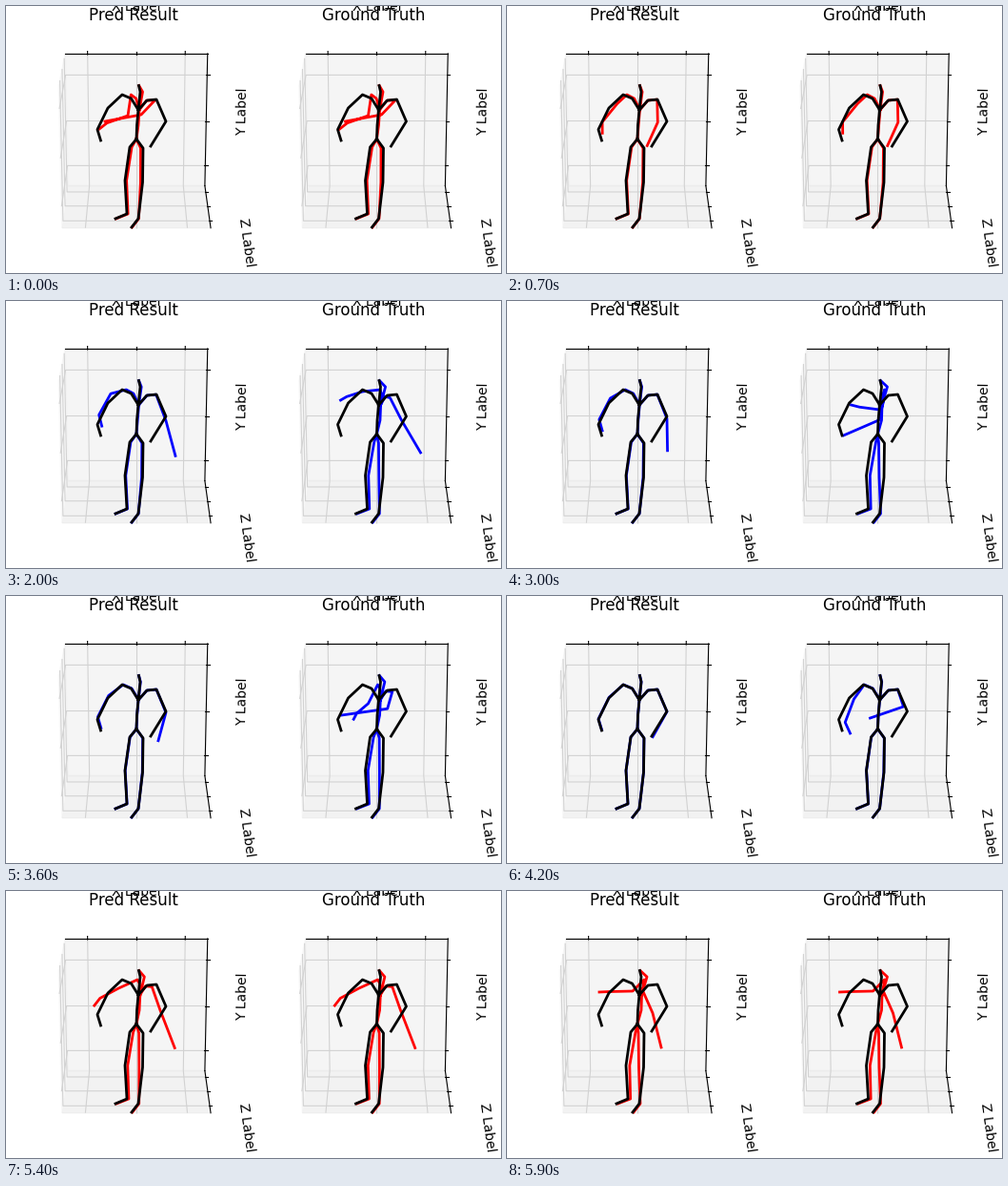
These frames come from a looping animation (520 by 280 pixels, 6000 ms). A matplotlib script:

```python
import numpy as np
import matplotlib.pyplot as plt
from matplotlib.animation import FuncAnimation

W, H, DPI = 520, 280, 100
FRAMES, STEP = 60, 100
SEEN, GOAL = 1400, 4500            # last seen pose and goal pose, in ms
PAD, SIDE, TOP = 15, 237.5, 23.8   # panel layout in pixels
PANEL_SHIFT = SIDE + PAD
LIMIT = 0.7 * 25 / 24              # half range of each axis with its margin

plt.rcParams.update({"font.family": "DejaVu Sans", "grid.color": "#d2d2d2"})

# Joints of the body facing front, in pixels of the left panel.
TRUNK = np.array([(137, 139.5), (137.5, 125), (139, 109), (141, 90), (139.5, 83.5)])
LEG_A = np.array([(130, 148), (125, 183), (127, 218), (115, 223)])
LEG_B = np.array([(144, 149), (143.5, 185), (139, 223), (132, 232)])
SHOULDER_A = np.array([(131.5, 97), (122, 93)])
SHOULDER_B = np.array([(148, 99), (158, 98)])

# Time: turn of the body in degrees, then elbow and hand of arms A and B.
KEYS = {
    0: (25, 128, 115, 98, 129, 142, 114, 104, 121),
    SEEN: (15, 111, 94, 101, 128, 168, 127, 179, 163),
    2000: (58, 122, 95, 99, 104, 163, 125, 183, 159),
    3000: (90, 139, 114, 109, 109, 138, 125, 101, 141),
    4200: (2, 112, 108, 108, 144, 164, 116, 129, 128),
    GOAL: (0, 107, 107, 99.5, 141, 168, 121, 152, 147),
    4900: (12, 108, 102, 92.5, 133, 168, 122, 178, 160),
    5900: (90, 132, 105, 97, 106, 153, 128, 162, 164),
}
TIMES = np.array(list(KEYS), float)
STATES = np.array(list(KEYS.values()), float)
SLOPES = np.gradient(STATES, TIMES, axis=0)


def true_state(t):
    """Cubic Hermite curve through the keys."""
    i = int(np.clip(np.searchsorted(TIMES, t) - 1, 0, len(TIMES) - 2))
    h = TIMES[i + 1] - TIMES[i]
    u = (t - TIMES[i]) / h
    ease = u * u * (3 - 2 * u)
    return (STATES[i] * (1 - ease) + STATES[i + 1] * ease
            + h * u * (1 - u) * ((1 - u) * SLOPES[i] - u * SLOPES[i + 1]))


def guessed_state(t):
    """Blend from the last seen pose to the goal; hand B starts late."""
    u = (t - SEEN) / (GOAL - SEEN)
    late = u ** 1.3
    weight = np.full(STATES.shape[1], 1 - (1 - u) ** 1.3)
    weight[-2:] = late * late * (3 - 2 * late)
    return true_state(SEEN) * (1 - weight) + true_state(GOAL) * weight


def shifted(joints, dx, dy=0):
    return joints + np.column_stack(np.broadcast_arrays(dx, dy, joints[:, 0])[:2])


def forearm(elbow, hand, bend):
    """Elbow, wrist and hand; a hanging forearm bows outwards."""
    dx, dy = hand - elbow
    wrist = elbow + 0.7 * (hand - elbow) - bend * dy * np.array([dy, -dx])
    return np.array([elbow, wrist, hand])


def skeleton(state):
    """All limbs as one polyline, broken by nan rows."""
    turn = np.radians(state[0])
    near, far = np.sin(turn), 1 - np.cos(turn)
    elbow_a, hand_a, elbow_b, hand_b = state[1:].reshape(4, 2)

    trunk = shifted(TRUNK, near * np.array([0, 3.5, 2.5, 6, 0.5]))
    leg_a = shifted(LEG_A, near * np.linspace(5, 1.5, 4))
    leg_b = shifted(LEG_B, near * np.array([-6, -5, 1, 1]))
    swing_a = near * np.array([12, 22])
    swing_b = far * np.array([-5, -15])
    arm_a = np.vstack([shifted(SHOULDER_A, swing_a), forearm(elbow_a, hand_a, 0.005)])
    arm_b = np.vstack([shifted(SHOULDER_B, swing_b, -swing_b / 2),
                       forearm(elbow_b, hand_b, 0)])

    rows = [trunk]
    for root, limb in ((0, leg_a), (0, leg_b), (2, arm_a), (2, arm_b)):
        rows += [np.full((1, 2), np.nan), trunk[root:root + 1], limb]
    return np.vstack(rows).T


def add_box(left, title):
    ax = fig.add_axes([left / W, 1 - (TOP + SIDE) / H, SIDE / W, SIDE / H],
                      projection="3d")
    # The tiny tilt settles which side wall is drawn.
    ax.view_init(elev=110, azim=-90.00001)
    for name in "xyz":
        ax.set(**{f"{name}lim": (-LIMIT, LIMIT),
                  f"{name}ticks": (-0.5, 0, 0.5),
                  f"{name}ticklabels": [],
                  f"{name}label": f"{name.upper()} Label"})
    ax.set_title(title)


fig = plt.figure(figsize=(W / DPI, H / DPI), dpi=DPI, facecolor="white")
add_box(PAD, "Pred Result")
add_box(PAD + PANEL_SHIFT, "Ground Truth")

stage = fig.add_axes([0, 0, 1, 1], zorder=5)
stage.set(xlim=(0, W), ylim=(H, 0))
stage.axis("off")

goal_x, goal_y = skeleton(true_state(GOAL))
bodies = []
for shift in (0, PANEL_SHIFT):
    bodies += stage.plot([], [], lw=2, zorder=2)
    stage.plot(goal_x + shift, goal_y, color="black", lw=2, zorder=3)


def draw(frame):
    t = frame * STEP
    hidden = SEEN < t < GOAL
    truth = true_state(t)
    states = (guessed_state(t) if hidden else truth, truth)
    for body, state, shift in zip(bodies, states, (0, PANEL_SHIFT)):
        x, y = skeleton(state)
        body.set_data(x + shift, y)
        body.set_color("blue" if hidden else "red")
    return bodies


anim = FuncAnimation(fig, draw, frames=FRAMES, interval=STEP,
                     repeat=True, repeat_delay=0, blit=False)
plt.show()
```
